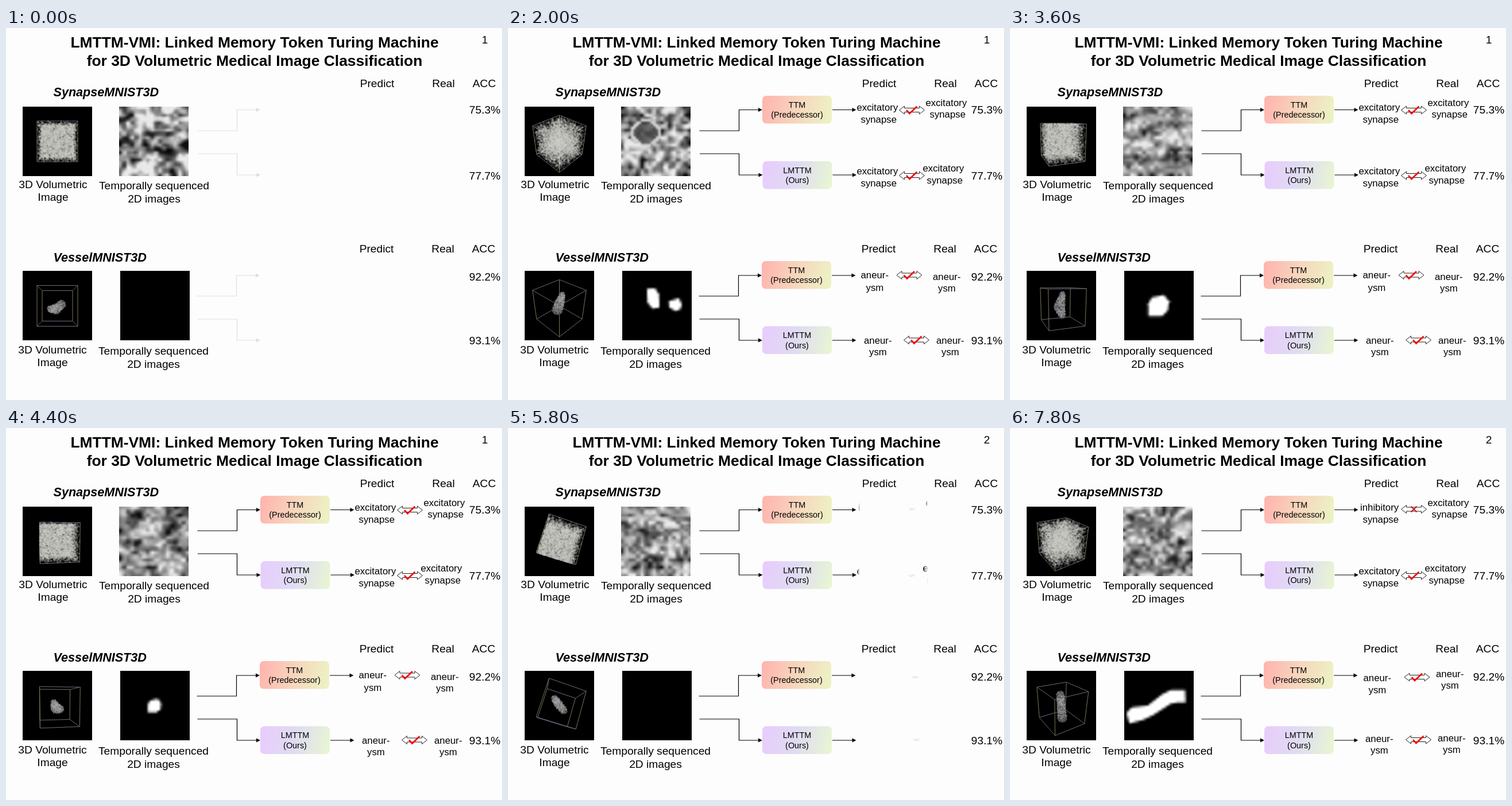
These frames come from a looping animation (864x648 px, 8000 ms). An HTML page with a canvas:

```html
<!DOCTYPE html>
<html lang="en">
<head>
<meta charset="utf-8">
<title>LMTTM-VMI</title>
<style>
html, body { margin: 0; width: 100%; height: 100%; overflow: hidden; background: #fdfdfe; }
canvas { display: block; }
</style>
</head>
<body>
<canvas id="stage" width="864" height="648"></canvas>
<script>
const ctx = document.getElementById('stage').getContext('2d');
const LOOP = 8, SLIDE = 5, STEP = 0.2, GRID = 28, TILE = 121;
const FONT = '"Liberation Sans", Arial, sans-serif';

const clamp = (v, lo = 0, hi = 1) => Math.min(hi, Math.max(lo, v));
const ramp = (t, from, to) => clamp((t - from) / (to - from));
const mix = (a, b, k) => a + (b - a) * k;

function hash(x, y, z) {
  const s = Math.sin(x * 127.1 + y * 311.7 + z * 74.7) * 43758.5453;
  return s - Math.floor(s);
}

function noise(x, y, z) {
  const X = Math.floor(x), Y = Math.floor(y), Z = Math.floor(z);
  const u = x - X, v = y - Y, w = z - Z;
  const plane = k => mix(
    mix(hash(X, Y, k), hash(X + 1, Y, k), u),
    mix(hash(X, Y + 1, k), hash(X + 1, Y + 1, k), u), v);
  return mix(plane(Z), plane(Z + 1), w);
}

// Linear interpolation over rows of [time, ...values]
function sample(rows, t) {
  const i = Math.max(1, rows.findIndex(r => r[0] >= t));
  const a = rows[i - 1], b = rows[i], k = ramp(t, a[0], b[0]);
  return a.slice(1).map((v, j) => mix(v, b[j + 1], k));
}

function text(str, x, y, size, { style = '', align = 'center', fill = '#000' } = {}) {
  ctx.font = `${style} ${size}px ${FONT}`;
  ctx.textAlign = align;
  ctx.fillStyle = fill;
  ctx.fillText(str, x, y);
}

function path(points, close) {
  ctx.beginPath();
  points.forEach(([x, y]) => ctx.lineTo(x, y));
  if (close) ctx.closePath();
}

function withAlpha(alpha, draw) {
  if (alpha <= 0) return;
  ctx.save();
  ctx.globalAlpha = alpha;
  draw();
  ctx.restore();
}

function arrow(...points) {
  const [x, y] = points[points.length - 1];
  ctx.strokeStyle = ctx.fillStyle = '#000';
  ctx.lineWidth = 1.2;
  path([...points.slice(0, -1), [x - 6, y]]);
  ctx.stroke();
  path([[x, y], [x - 7, y - 3.5], [x - 7, y + 3.5]], true);
  ctx.fill();
}

// ---- Rotating volumes ----
const VIEW = [ // time, yaw, pitch, roll
  [0, 0, 0, 0], [0.8, 6, -9, 17], [1.2, 12, -9, 24], [2, 45, 35, 0],
  [2.8, 33, 27, 1], [3.6, 20, 10, 0], [5, 0, 0, 0]];

function projector(t, cx, cy) {
  const [yaw, pitch, roll] = sample(VIEW, t).map(d => d * Math.PI / 180);
  const turn = (a, b, r) => [a * Math.cos(r) - b * Math.sin(r), a * Math.sin(r) + b * Math.cos(r)];
  return (x, y, z) => {
    [z, x] = turn(z, x, yaw);
    [z, y] = turn(z, y, pitch);
    [x, y] = turn(x, y, roll);
    const s = 208.7 / (6.88 - z);
    return [cx + x * s, cy + y * s];
  };
}

function wireframe(project) {
  ctx.lineWidth = 1;
  const colors = ['#6b6b80', '#7d7458', '#66666c'];
  for (const a of [-1, 1]) for (const b of [-1, 1]) {
    const edges = [[[-1, a, b], [1, a, b]], [[a, -1, b], [a, 1, b]], [[a, b, -1], [a, b, 1]]];
    edges.forEach(([p, q], i) => {
      ctx.strokeStyle = colors[i];
      path([project(...p), project(...q)]);
      ctx.stroke();
    });
  }
}

function blackTile(x, y) {
  ctx.fillStyle = '#000';
  ctx.fillRect(x, y, TILE, TILE);
}

function tissueVolume(t) {
  blackTile(29, 137);
  const project = projector(t, 89.5, 197.5);
  wireframe(project);
  ctx.fillStyle = 'rgba(204,204,200,0.18)';
  for (let i = 0; i < 5000; i++) {
    const [x, y] = project(...[1, 2, 3].map(k => hash(i, k, 5) * 2 - 1));
    ctx.fillRect(x - 1.5, y - 1.5, 3, 3);
  }
}

// Three beads (x, y, radius) per row; the vessel is the chain through them
const VESSELS = [
  [[0, 77, 489, 6, 87, 490, 9, 97, 481, 8], [1.2, 90, 467, 6, 88, 482, 8, 88, 492, 10],
   [2, 95, 464, 5, 90, 478, 9, 86, 491, 10], [3.6, 92, 463, 5, 86, 485, 11, 91, 501, 6],
   [5, 77, 489, 6, 87, 490, 9, 97, 481, 8]],
  [[0, 92, 477, 6, 89, 485, 8, 87, 493, 7], [0.8, 81, 471, 6, 87, 480, 8, 97, 492, 7],
   [2.8, 88, 465, 8, 89, 483, 8, 91, 505, 9], [5, 92, 477, 6, 89, 485, 8, 87, 493, 7]]];

function vesselVolume(t, slide) {
  blackTile(29, 423);
  wireframe(projector(t, 89.5, 484));
  const beads = sample(VESSELS[slide], t);
  const bead = u => {
    const i = u < 1 ? 0 : 3;
    return [0, 1, 2].map(k => mix(beads[i + k], beads[i + 3 + k], u - i / 3));
  };
  ctx.fillStyle = '#484848';
  for (let u = 0; u <= 2; u += 0.25) {
    const [x, y, r] = bead(u);
    ctx.beginPath();
    ctx.arc(x, y, r * 0.9, 0, 7);
    ctx.fill();
  }
  ctx.fillStyle = 'rgba(165,165,165,0.3)';
  for (let i = 0; i < 420; i++) {
    const [x, y, r] = bead(hash(i, 1, 9) * 2);
    const angle = hash(i, 2, 9) * 2 * Math.PI, d = r * Math.sqrt(hash(i, 3, 9));
    ctx.fillRect(x + d * Math.cos(angle) - 1, y + d * Math.sin(angle) - 1, 2, 2);
  }
}

// ---- 2D slices, drawn small and enlarged ----
const small = document.createElement('canvas');
small.width = small.height = GRID;
const slice = small.getContext('2d');

function enlarge(x, y) {
  ctx.imageSmoothingQuality = 'high';
  ctx.drawImage(small, x, y, TILE, TILE);
}

function tissueSlice(t, slide) {
  const img = slice.createImageData(GRID, GRID);
  const z = t * 3 + slide * 40;
  const cell = slide === 0 && t > 0.7 && t < 2.7;
  const cx = mix(6.5, 9.5, ramp(t, 1.2, 2));
  for (let y = 0; y < GRID; y++) for (let x = 0; x < GRID; x++) {
    const v = 0.5 * noise(x / 5 + y / 9, y / 3.4, z) + 0.5 * noise(x / 1.6, y / 1.5, z * 2 + 9);
    let gray = 142 + (v - 0.5) * 460;
    const d = Math.hypot((x - cx) / 5, (y - 10) / 4.2);
    if (cell && d < 1.25) gray = d < 1 ? 55 + gray * 0.25 : 205;
    const i = (y * GRID + x) * 4;
    img.data.fill(clamp(gray, 12, 232), i, i + 3);
    img.data[i + 3] = 255;
  }
  slice.putImageData(img, 0, 0);
  enlarge(197, 137);
}

const SPOTS = [
  { slide: 0, from: 1, to: 3, at: [290, 481],
    outline: [[280, 476], [298, 470], [303, 482], [300, 490], [292, 493], [281, 487]] },
  { slide: 0, from: 1.25, to: 2.75, at: [253, 470],
    outline: [[242, 454], [256, 453], [263, 464], [264, 487], [252, 489], [243, 478]] },
  { slide: 0, from: 2.5, to: 4.7, at: [258, 484],
    outline: [[247, 469], [268, 465], [277, 476], [275, 492], [265, 502], [241, 502], [241, 480]] },
  { slide: 1, from: 1.2, to: 4.4, at: [255, 485],
    outline: [[203, 497], [212, 487], [240, 483], [265, 464], [280, 457], [305, 457],
      [306, 478], [292, 478], [280, 480], [250, 500], [232, 508], [208, 515]] }];

function vesselSlice(t, slide) {
  slice.fillStyle = '#000';
  slice.fillRect(0, 0, GRID, GRID);
  slice.fillStyle = '#fff';
  for (const s of SPOTS) {
    if (s.slide !== slide || t <= s.from || t >= s.to) continue;
    const size = Math.sqrt(Math.sin(Math.PI * ramp(t, s.from, s.to)));
    slice.beginPath();
    for (const [x, y] of s.outline) {
      slice.lineTo((mix(s.at[0], x, size) - 199) * GRID / TILE, (mix(s.at[1], y, size) - 423) * GRID / TILE);
    }
    slice.fill();
  }
  enlarge(199, 423);
}

// ---- Diagram ----
function labels(slide) {
  const title = { style: 'bold' };
  text('LMTTM-VMI: Linked Memory Token Turing Machine', 433, 34, 26.4, title);
  text('for 3D Volumetric Medical Image Classification', 433, 66, 26.4, title);
  text(slide + 1, 834, 27, 19.2);
  const heading = { style: 'italic bold', align: 'left' };
  text('SynapseMNIST3D', 82.5, 119, 21.6, heading);
  text('VesselMNIST3D', 82.5, 407, 21.6, heading);
  for (const [dx, dy] of [[0, 0], [-1, 288]]) {
    text('Predict', 646.5 + dx, 103 + dy, 19.2);
    text('Real', 762 + dx, 103 + dy, 19.2);
    text('ACC', 833 + dx, 103 + dy, 19.2);
    text('3D Volumetric', 82 + dx, 278.5 + dy, 19.2);
    text('Image', 82 + dx, 301 + dy, 19.2);
    text('Temporally sequenced', 258 + dx, 281 + dy, 19.2);
    text('2D images', 258 + dx, 303.5 + dy, 19.2);
  }
  [['75.3%', 149], ['77.7%', 264], ['92.2%', 440], ['93.1%', 551]]
    .forEach(([value, y]) => text(value, 834, y, 19.2));
}

const ROWS = [ // box left and top, input line, arrow height
  { x: 443, y: 118, input: 179, mid: 142.5, ours: false },
  { x: 443.5, y: 232, input: 219, mid: 256, ours: true },
  { x: 442, y: 406, input: 467, mid: 431, ours: false },
  { x: 443, y: 519.5, input: 507, mid: 544, ours: true }];

function modelBox({ x, y, ours }) {
  const g = ctx.createLinearGradient(x, y + 10, x + 121, y + 38);
  const colors = ours ? ['#e8ccfc', '#dfdcf2', '#e8f6d2'] : ['#ffb4ae', '#f6d6bd', '#ecf3c4'];
  colors.forEach((c, i) => g.addColorStop(i / 2, c));
  ctx.fillStyle = g;
  ctx.beginPath();
  ctx.roundRect(x, y, 121, 48.5, 7);
  ctx.fill();
  text(ours ? 'LMTTM' : 'TTM', x + 60.5, y + 20.5, 14.4);
  text(ours ? '(Ours)' : '(Predecessor)', x + 60.5, y + 38, 14.4);
}

const EXC = ['excitatory', 'synapse'], INH = ['inhibitory', 'synapse'], ANEU = ['aneur-', 'ysm'];
const SYNAPSE_REAL = [[EXC, 727.5, 136, 734.5, 156], [EXC, 722.5, 250, 729.5, 271]];
const OURS_PREDICT = [EXC, 607.5, 254.5, 614.5, 275.5];
const RESULTS = [
  { predict: [[EXC, 607.5, 144, 614.5, 164.5], OURS_PREDICT,
      [ANEU, 614.5, 436, 623.5, 458], [ANEU, 620, 550, 629, 570]],
    real: [...SYNAPSE_REAL, [ANEU, 740, 438.5, 749, 459], [ANEU, 746, 550, 755, 570]],
    marks: [[703.5, 143, true], [703.5, 257, true], [699, 430.5, true], [711.5, 543.5, true]] },
  { predict: [[INH, 610, 144, 614.5, 164.5], OURS_PREDICT,
      [ANEU, 615.5, 441, 624.5, 461.5], [ANEU, 619, 547, 628, 567]],
    real: [...SYNAPSE_REAL, [ANEU, 742, 434, 751, 454], [ANEU, 745, 546, 754, 566]],
    marks: [[703.5, 141.5, false], [703.5, 257, true], [709, 434, true], [711.5, 543, true]] }];

// Text revealed left to right behind a soft edge
function wipedColumn(entries, left, progress) {
  if (progress <= 0) return;
  const edge = left + progress * 105;
  const fill = ctx.createLinearGradient(edge - 6, 0, edge, 0);
  fill.addColorStop(0, '#000');
  fill.addColorStop(1, 'rgba(0,0,0,0)');
  for (const [words, x1, y1, x2, y2] of entries) {
    text(words[0], x1, y1, 16.8, { align: 'left', fill });
    text(words[1], x2, y2, 16.8, { align: 'left', fill });
  }
}

function verdict([x, y, correct], scale) {
  ctx.translate(x, y);
  ctx.scale(scale, scale);
  path([[-22, 0], [-13, -7], [-13, -3.5], [13, -3.5], [13, -7], [22, 0],
    [13, 7], [13, 3.5], [-13, 3.5], [-13, 7]], true);
  ctx.fillStyle = '#fff';
  ctx.fill();
  ctx.strokeStyle = '#222';
  ctx.lineWidth = 1;
  ctx.stroke();
  ctx.strokeStyle = correct ? '#f01010' : '#c41e1e';
  ctx.lineWidth = correct ? 2.8 : 2;
  if (correct) {
    path([[-9.5, 0], [-4, 6], [9, -6.5]]);
  } else {
    path([[-5, -5], [5, 5]]);
    ctx.moveTo(5, -5);
    ctx.lineTo(-5, 5);
  }
  ctx.stroke();
}

function render(time) {
  const slide = time < SLIDE ? 0 : 1, t = time - slide * SLIDE;
  ctx.fillStyle = '#fdfdfe';
  ctx.fillRect(0, 0, 864, 648);
  labels(slide);
  tissueVolume(t);
  tissueSlice(t, slide);
  vesselVolume(t, slide);
  vesselSlice(t, slide);

  withAlpha(ramp(t, -0.035, 0.26), () => ROWS.forEach(({ x, input, mid }) => {
    const bend = Math.floor(x) - 40.5;
    arrow([x - 109.5, input], [bend, input], [bend, mid], [x, mid]);
  }));
  withAlpha(ramp(t, 0.25, 0.52), () => ROWS.forEach(modelBox));
  withAlpha(ramp(t, 0.5, 0.78), () => ROWS.forEach(({ x, mid }) => arrow([x + 122, mid], [x + 163.5, mid])));

  const { predict, real, marks } = RESULTS[slide];
  const wipe = ramp(t, 0.76, 1.09);
  wipedColumn(predict, 601, wipe);
  wipedColumn(real, 719, wipe);
  const zoom = ramp(t, 0.7, 1.06);
  marks.forEach(m => withAlpha(zoom, () => verdict(m, zoom)));
}

let shown = -1;
function tick(now) {
  const step = Math.floor(now / 1000 % LOOP / STEP + 1e-6);
  if (step !== shown) render((shown = step) * STEP);
  requestAnimationFrame(tick);
}
tick(performance.now());
</script>
</body>
</html>
```
